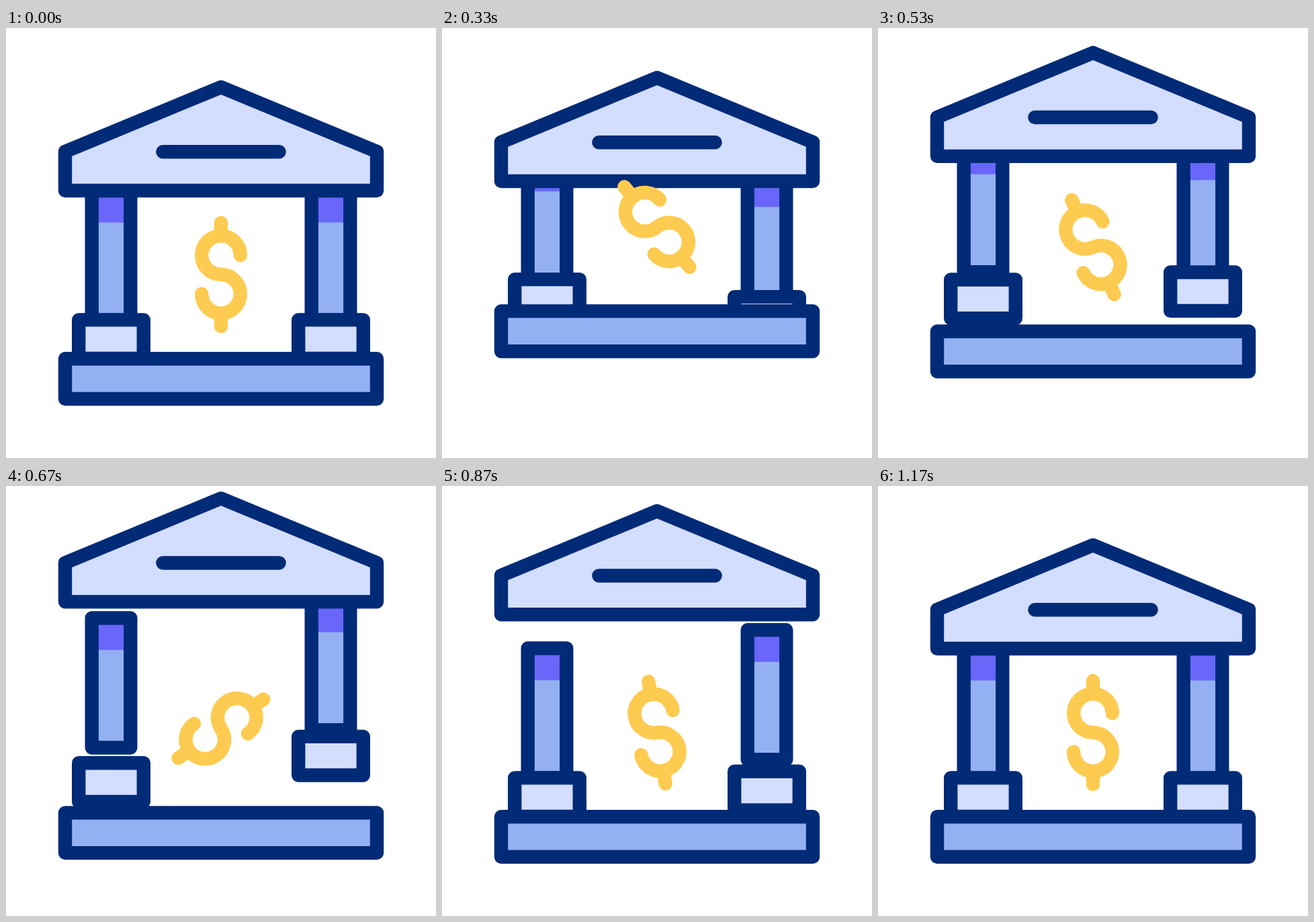
Animation, 640 px wide and 640 px high, one loop 1670 ms. Source, as an HTML page:

```html
<!DOCTYPE html>
<html lang="en">
<head>
<meta charset="utf-8">
<title>Bank</title>
<style>
  html, body { margin: 0; width: 100%; height: 100%; overflow: hidden; background: #fff; }
  svg { display: block; width: 100vw; height: 100vh; }
  .line { stroke: #022b77; stroke-width: 20.4; stroke-linecap: round; stroke-linejoin: round; }
  .pale { fill: #d3ddfd; }
  .mid { fill: #93b1f2; }
  .cap { fill: #6966f9; }
  .coin { fill: none; stroke: #fecb51; stroke-width: 20.4; stroke-linecap: round; }
</style>
</head>
<body>
<svg viewBox="0 0 640 640">
  <defs>
    <g id="column">
      <rect class="mid" x="-28.8" y="242" width="57.6" height="193"/>
      <rect class="cap" x="-28.8" y="242" width="57.6" height="47.5"/>
      <rect class="line" fill="none" x="-28.8" y="242" width="57.6" height="193"/>
    </g>
    <rect id="plinth" class="line pale" x="-48.3" y="434.4" width="96.6" height="57.6"/>
  </defs>
  <g id="leftColumn"><use href="#column" x="156.5"/></g>
  <g id="rightColumn"><use href="#column" x="483.5"/></g>
  <g id="leftPlinth"><use href="#plinth" x="156.5"/></g>
  <g id="rightPlinth"><use href="#plinth" x="483.5"/></g>
  <rect id="base" class="line mid" x="88" y="492.2" width="464" height="59.8"/>
  <g id="roof" class="line">
    <path class="pale" d="M88 184 320 88 552 184V242H88Z"/>
    <path d="M233.4 184.2H406.6"/>
  </g>
  <g id="dollar" class="coin">
    <path d="M28.8-28.8A28.8 28.8 0 1 0 0 0A28.8 28.8 0 1 1-28.8 28.8M0-77V-57.6M0 57.6V77"/>
  </g>
</svg>
<script>
  const LOOP = 1670, FRAME = 100 / 3, LIFT = -72.5;

  // Each part hops: start, peak and landing, in frames.
  const hops = {
    base: [0, 11, 21.9],
    leftPlinth: [1.2, 13.1, 24],
    leftColumn: [2.1, 15.4, 26.5],
    rightPlinth: [3.3, 17.2, 28.6],
    rightColumn: [4.3, 19.4, 30.8],
    roof: [5.3, 22, 33]
  };

  const el = id => document.getElementById(id);

  function ease(t, from, to) {
    const u = Math.min(1, Math.max(0, (t - from) / (to - from)));
    return u * u * (3 - 2 * u);
  }

  const hop = (t, [start, peak, end]) =>
    LIFT * (ease(t, start, peak) - ease(t, peak, end));

  function draw(t) {
    for (const id in hops) {
      el(id).setAttribute("transform", `translate(0 ${hop(t, hops[id]).toFixed(2)})`);
    }
    // Winds back, then swings through to a half turn, which looks the same as rest.
    const turn = -46 * ease(t, 0.1, 13.2) + 226 * ease(t, 13.2, 27.8);
    const y = 367 + hop(t, hops.base);
    el("dollar").setAttribute("transform",
      `translate(320 ${y.toFixed(2)}) rotate(${turn.toFixed(2)})`);
  }

  const origin = performance.now();

  function tick() {
    const ms = (performance.now() - origin) % LOOP;
    draw(Math.floor((ms + 3.4) / FRAME));
    requestAnimationFrame(tick);
  }

  draw(0);
  requestAnimationFrame(tick);
</script>
</body>
</html>
```
